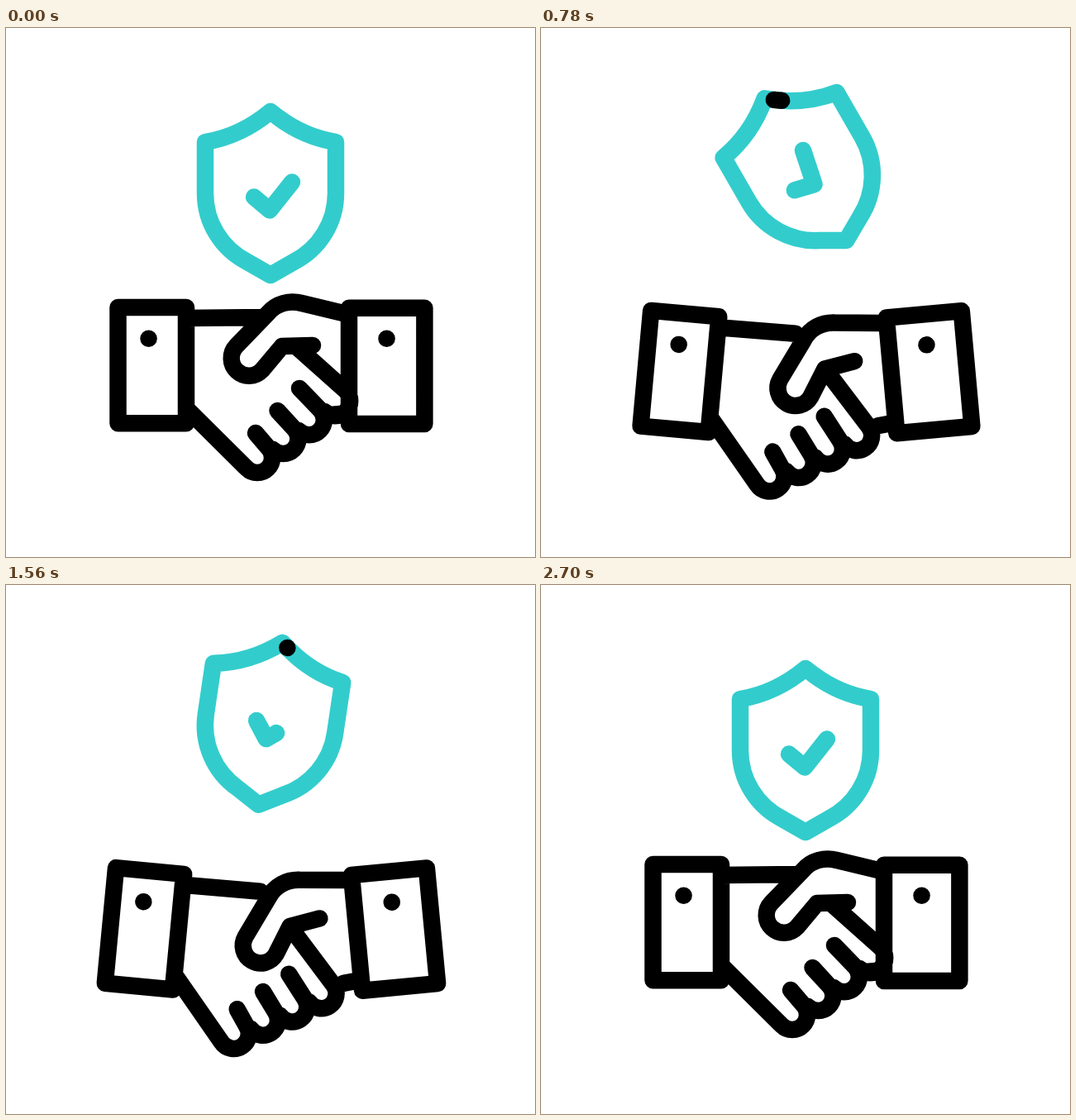
Recreate the animation shown at these times as an HTML page with a canvas. Size 640x640 px, loop 2820 ms.

```html
<!DOCTYPE html>
<html lang="en">
<head>
<meta charset="utf-8">
<title>Handshake with shield</title>
<style>
  html, body { margin: 0; width: 100%; height: 100%; overflow: hidden; background: #fff; }
  canvas { display: block; }
</style>
</head>
<body>
<canvas id="stage" width="640" height="640"></canvas>
<script>
const ctx = document.getElementById('stage').getContext('2d');
const LOOP = 2820, TEAL = '#33cccc', BLACK = '#000', RAD = Math.PI / 180;

// Keys are [time, value]; each span eases in and out.
const SHAKE = [[60, 0], [565, 1], [1065, .1], [1330, 1], [1930, 0]];
const LIFT = [[50, 0], [590, -51], [1120, 26], [1470, -40], [1800, 4], [2300, 0]];
const SWING = [[80, 0], [800, -30], [1350, 14.5], [1980, -9.6], [2680, 0]];

const SHIELD = new Path2D('M9-92Q41-68 79-62V0A93 93 0 0 1 28 83L0 99L-28 83' +
  'A93 93 0 0 1-79 0V-62Q-36-69 0-99Z');
const SHIELD_LENGTH = 567;
const CHECK = new Path2D('M-22.5-4L-3.5 12L23.5-22');
const CHECK_LENGTH = 69;

const ramp = (t, from, to) => Math.min(1, Math.max(0, (t - from) / (to - from)));

function follow(keys, t) {
  let value = keys[0][1];
  for (let i = 1; i < keys.length; i++) {
    const u = ramp(t, keys[i - 1][0], keys[i][0]);
    value += (keys[i][1] - keys[i - 1][1]) * (1 - Math.cos(Math.PI * u)) / 2;
  }
  return value;
}

function at(x, y, degrees, draw) {
  ctx.save();
  ctx.translate(x, y);
  ctx.rotate(degrees * RAD);
  draw();
  ctx.restore();
}

// Turns whatever is drawn in stage coordinates around a pivot.
const around = (x, y, degrees, draw) => at(x, y, degrees, () => {
  ctx.translate(-x, -y);
  draw();
});

function strokePart(path, color, from, to) {
  ctx.strokeStyle = color;
  ctx.setLineDash([Math.max(.1, to - from), 2000]);
  ctx.lineDashOffset = -from;
  ctx.stroke(path);
  ctx.setLineDash([]);
}

function drawShield(t) {
  const y = 200 + follow(LIFT, t);
  at(320, y, follow(SWING, t), () => {
    ctx.strokeStyle = TEAL;
    ctx.stroke(SHIELD);
    if (t > 770 && t < 1575) {
      strokePart(SHIELD, BLACK, SHIELD_LENGTH * ramp(t, 1010, 1556),
        SHIELD_LENGTH * ramp(t, 772, 1320));
    }
  });
  // The check mark swings wider and a little later than the shield.
  const shown = 1 - ramp(t, 946, 1325) + ramp(t, 1335, 1735);
  if (shown > 0) {
    at(322.5, y + 8.5, 1.95 * follow(SWING, t - 60),
      () => strokePart(CHECK, TEAL, 0, shown * CHECK_LENGTH));
  }
}

function line(x1, y1, x2, y2) {
  ctx.moveTo(x1, y1);
  ctx.lineTo(x2, y2);
}

function cuff(x, y, width, dotX) {
  ctx.rect(x, y, width, 140.3);
  line(dotX, 375.8, dotX + .1, 375.8);
}

function fingers() {
  for (let i = 3; i >= 0; i--) {
    if (i === 3) ctx.moveTo(352, 386);
    else ctx.moveTo(302 + 26.5 * i, 490 - 27 * i);
    ctx.arc(304 + 31.4 * i, 520 - 22.9 * i, 18, -45 * RAD, 135 * RAD);
  }
}

function thumb() {
  line(412, 346, 358, 333);
  ctx.bezierCurveTo(343, 329, 327, 333, 317, 345);
  ctx.arc(294, 399.5, 21.3, 223 * RAD, 43 * RAD, true);
  ctx.lineTo(334, 385);
  ctx.lineTo(371, 384);
}

// The cuffs lead; the hands bend further and trail behind.
function drawHands(t) {
  const shake = delay => follow(SHAKE, t - delay);
  const leftArm = draw => around(91, 314, 8 * shake(0), draw);
  const rightArm = draw => around(547, 314, -8 * shake(0), draw);

  ctx.beginPath();
  around(174.5, 389.5, 15 * shake(35), fingers);
  leftArm(() => {
    ctx.lineTo(220, 462);
    line(218, 351, 312, 350);
    cuff(135.5, 338, 82.5, 172.5);
  });
  around(459, 357.5, -16.3 * shake(60), thumb);
  rightArm(() => {
    line(393, 468, 415, 466);
    cuff(415, 338.7, 91.4, 460.5);
  });
  ctx.strokeStyle = BLACK;
  ctx.stroke();
}

function render() {
  const t = performance.now() % LOOP;
  ctx.clearRect(0, 0, 640, 640);
  ctx.lineWidth = 20.5;
  ctx.lineCap = ctx.lineJoin = 'round';
  drawShield(t);
  drawHands(t);
  requestAnimationFrame(render);
}
render();
</script>
</body>
</html>
```
